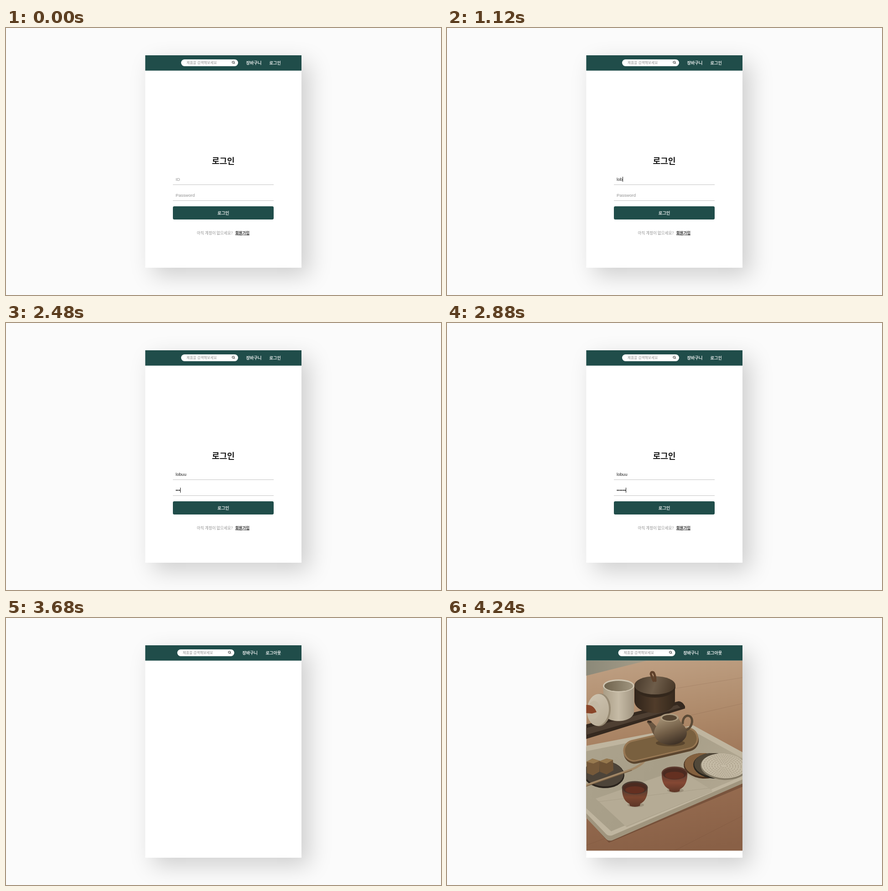
Recreate the animation shown at these times as an HTML page with a canvas. Size 954 by 587 pixels, loop 5.04 s.

```html
<!DOCTYPE html>
<html lang="ko">
<head>
<meta charset="utf-8">
<title>로그인</title>
<style>
html, body { margin: 0; width: 100%; height: 100%; overflow: hidden; background: #fbfbfb; }
canvas { display: block; }
</style>
</head>
<body>
<canvas id="stage" width="954" height="587"></canvas>
<script>
const ctx = document.getElementById('stage').getContext('2d');
const LOOP = 5040;
const KO = '"Noto Sans CJK KR", "Noto Sans CJK", sans-serif';
const ARIAL = '"Liberation Sans", sans-serif';
const GREEN = '#204d4a', INK = '#1b1b1b', GRAY = '#929292';
const CARD = { x: 305.4, y: 60, w: 342.6, h: 467 };

const USER = 'lobuu';
const ID_KEYS = [960, 1040, 1120, 1280, 1360];
const PW_KEYS = [2240, 2320, 2480, 2640, 2720, 2880];
const CARET_ON = [[240, 720], [960, 2000], [2240, 3280]];
const FOCUS_PW = 1600, LOGGED_IN = 3520, FORM_GONE = 3680, PHOTO_TOP = 4080, PHOTO_FULL = 4240;

function rect(x, y, w, h, color) {
  ctx.fillStyle = color;
  ctx.fillRect(x, y, w, h);
}

function round(x, y, w, h, r, color) {
  ctx.fillStyle = color;
  ctx.beginPath();
  ctx.roundRect(x, y, w, h, r);
  ctx.fill();
}

function oval(x, y, rx, ry, color, tilt = 0) {
  ctx.fillStyle = color;
  ctx.beginPath();
  ctx.ellipse(x, y, rx, ry, tilt, 0, Math.PI * 2);
  ctx.fill();
}

function shape(path, color) {
  ctx.fillStyle = color;
  ctx.fill(new Path2D(path));
}

function line(path, color, width) {
  ctx.strokeStyle = color;
  ctx.lineWidth = width;
  ctx.lineCap = ctx.lineJoin = 'round';
  ctx.stroke(new Path2D(path));
}

// A thin outline stands in for the medium weight.
function text(str, x, y, size, color, { font = KO, weight = 400, align = 'left', medium = false } = {}) {
  ctx.font = `${weight} ${size}px ${font}`;
  ctx.textAlign = align;
  ctx.fillStyle = ctx.strokeStyle = color;
  ctx.fillText(str, x, y);
  if (medium) {
    ctx.lineWidth = 0.25;
    ctx.strokeText(str, x, y);
  }
}

// Linear gradient between two points with evenly spaced colours.
function fade(x0, y0, x1, y1, ...colors) {
  const g = ctx.createLinearGradient(x0, y0, x1, y1);
  colors.forEach((c, i) => g.addColorStop(i / (colors.length - 1), c));
  return g;
}

function drawCard() {
  rect(0, 0, 954, 587, '#fbfbfb');
  ctx.save();
  ctx.shadowColor = 'rgba(0,0,0,.18)';
  ctx.shadowBlur = 47;
  ctx.shadowOffsetX = ctx.shadowOffsetY = 17;
  rect(CARD.x, CARD.y, CARD.w, CARD.h, '#fff');
  ctx.restore();
}

function drawHeader(loggedIn) {
  rect(CARD.x, CARD.y, CARD.w, 33.7, GREEN);
  const dx = loggedIn ? -8.4 : 0;
  round(384 + dx, 69, 125, 15, 7.5, '#fff');
  text('제품을 검색해보세요', 396 + dx, 79.2, 7.8, GRAY);
  ctx.save();
  ctx.translate(498.3 + dx, 75.2);
  line('M2.4 0A2.4 2.4 0 1 1-2.4 0A2.4 2.4 0 1 1 2.4 0M1.8 1.8L3.4 3.4', INK, 1);
  ctx.restore();
  text('장바구니', 526.6 + dx, 80, 9.2, '#fff', { medium: true });
  text(loggedIn ? '로그아웃' : '로그인', loggedIn ? 569.4 : 577.6, 80, 9.2, '#fff', { medium: true });
}

function drawField(value, hint, base, caret) {
  text(value || hint, 372, base, 9.6, value ? INK : GRAY, { font: ARIAL });
  rect(366, base + 8, 221, 1, '#c4c4c4');
  if (caret) rect(Math.round(372 + ctx.measureText(value).width), base - 9, 1, 11, '#111');
}

function drawForm(t) {
  const typed = keys => keys.filter(k => t >= k).length;
  const caret = CARET_ON.some(([a, b]) => t >= a && t < b);
  text('로그인', 476.5, 299.3, 18.2, INK, { weight: 700, align: 'center' });
  drawField(USER.slice(0, typed(ID_KEYS)), 'ID', 336, caret && t < FOCUS_PW);
  drawField('•'.repeat(typed(PW_KEYS)), 'Password', 371, caret && t >= FOCUS_PW);
  round(366, 392, 221, 29, 3, GREEN);
  text('로그인', 476.5, 410.1, 9.3, '#fff', { align: 'center', medium: true });
  text('아직 계정이 없으세요?', 418.7, 453.7, 8.55, GRAY);
  text('회원가입', 502.7, 453.7, 8.55, INK, { medium: true });
  rect(503, 454.6, 31, 0.8, INK);
}

function drawTeaCup(x, y, glaze, clay) {
  oval(x + 2, y + 38, 18, 5, 'rgba(60,45,30,.2)');
  shape(`M${x - 28} ${y}C${x - 29} ${y + 24} ${x - 18} ${y + 33} ${x - 12} ${y + 35}
    L${x - 11} ${y + 40}Q${x} ${y + 44} ${x + 11} ${y + 40}L${x + 12} ${y + 35}
    C${x + 18} ${y + 33} ${x + 29} ${y + 24} ${x + 28} ${y}Z`,
    fade(0, y, 0, y + 42, glaze, clay, '#5c3526'));
  oval(x, y, 28.5, 14.5, glaze);
  oval(x, y + 1, 26, 12.5, '#4b2a20');
  oval(x, y + 5, 21, 8, '#643021');
}

function drawBackRow() {
  shape('M305 94H437L305 127Z', fade(305, 94, 420, 94, '#8b8979', '#a39a86'));
  shape('M305 234L508 183Q516 183 522 194V199L305 266Z', '#35291f');
  shape('M305 242L505 191L512 197L305 257Z', '#4e3f32');

  // covered pot
  shape('M411 150V182C411 200 436 209 457 209C481 209 500 199 500 181V150Z',
    fade(411, 0, 501, 0, '#30241a', '#503c2a', '#35281c'));
  oval(456, 152, 45, 23, '#33271c');
  oval(456, 148, 45, 20, fade(411, 130, 501, 160, '#46382a', '#6e5d4a', '#463626'));
  line('M453 138L447 123Q448 117 453 120Q457 126 457 138', '#5f412b', 5);

  // tall cup
  shape('M342 149L346 212C350 232 405 232 410 208V149Z',
    fade(342, 0, 411, 0, '#a99d86', '#c6bba6', '#a09480'));
  oval(376.5, 149, 34.5, 14, '#cfc5b1');
  oval(376.5, 149.5, 31.5, 11.5, fade(345, 0, 408, 0, '#6f634d', '#a0957f'));

  // leaning lid
  oval(335, 202, 24, 36, '#988b74', 0.08);
  oval(331, 202, 24, 35, fade(305, 170, 355, 235, '#cfc5b2', '#b7ab95'), 0.08);
  oval(322, 202, 13, 20, '#c3b8a3', 0.08);
  shape('M305 191Q322 190 328 207L318 210L305 209Z', '#8a4529');
}

function drawTeapot() {
  ctx.save();
  ctx.translate(469, 279);
  ctx.rotate(-0.23);
  round(-84, -21, 168, 49, 25, '#5b452e');
  round(-84, -25, 168, 48, 24, '#977753');
  round(-80, -21, 160, 41, 20, '#79603f');
  ctx.restore();

  oval(490, 275, 32, 7, 'rgba(40,28,18,.4)');
  line('M517 231C517 209 541 210 537 231C534 243 527 246 520 248', '#5b4a36', 5);
  shape('M438 229Q444 224 450 229L463 242L468 265Q455 264 449 248Q446 237 438 229Z', '#695540');
  shape('M468 219C466 232 453 240 454 255C456 270 474 279 490 279C509 279 526 268 526 252C525 236 511 232 508 219Z',
    fade(475, 220, 498, 280, '#a08d71', '#715d46', '#3c2f24'));
  oval(488, 219, 20, 9, '#ac9b7f');
  oval(488, 219.5, 16, 6.5, '#574633');
  oval(444, 228, 5, 2.5, '#3f3024', 0.2);
}

function drawCoaster(x, y, rx, ry, edge, face) {
  oval(x, y + 2, rx, ry, edge, 0.07);
  oval(x, y, rx - 2, ry - 2, face, 0.07);
}

function drawFrontTray() {
  shape('M305 438L355 494L648 371V362L356 484Z', 'rgba(60,36,22,.3)');
  shape('M305 284L541 237L648 298V364L362 489Q354 491 349 486L305 439Z', '#a0957e');
  shape('M305 281L540 236L648 295V355L362 478Q354 480 349 475L305 429Z', '#bfb59f');
  shape('M305 293L535 246L648 308V348L360 469L305 418Z',
    fade(340, 270, 560, 430, '#aba28c', '#a79e88', '#b0a690'));
  shape('M326 397L509 333L582 379L394 460Z', '#b5ab95');
  line('M331 404L575 374M394 458L581 381', '#a99f89', 1);

  drawCoaster(563, 323, 44, 28, '#4a3320', '#83603e');
  drawCoaster(586, 323, 46, 28, '#29261f', '#514839');
  drawCoaster(607, 325, 51, 29, '#857b67', '#c4baa5');
  ctx.setLineDash([2, 3]);
  for (let r = 8; r < 46; r += 6) {
    ctx.strokeStyle = '#a99e88';
    ctx.lineWidth = 1.5;
    ctx.beginPath();
    ctx.ellipse(607, 325, r, r * 0.55, 0.07, 0, Math.PI * 2);
    ctx.stroke();
  }
  ctx.setLineDash([]);

  drawCoaster(344, 342, 45, 30, '#2b241d', '#4d4439');
  shape('M306 316L319 309L335 314L334 338L320 346L307 341Z', '#75593a');
  shape('M306 316L319 309L335 314L321 320Z', '#987a50');
  shape('M334 315L350 309L364 312L365 335L350 344L335 338Z', '#6d5235');
  shape('M334 315L350 309L364 312L350 320Z', '#95774d');
  line('M305 368L405 333Q426 324 434 313', '#a28867', 5);
  line('M305 370L405 335', '#765c40', 1.5);

  drawTeapot();
  drawTeaCup(412, 373, '#493a31', '#7b452f');
  drawTeaCup(499, 341, '#5c3a2e', '#854834');
}

function drawPhoto(bottom) {
  ctx.save();
  ctx.beginPath();
  ctx.rect(CARD.x, 93.7, CARD.w, bottom - 93.7);
  ctx.clip();
  rect(CARD.x, 93, CARD.w, 420, fade(470, 94, 510, 511, '#bd9e81', '#ac8767', '#966c50', '#896046'));
  line('M500 155L648 131M530 215L648 188M305 500L390 468M500 511L648 435', 'rgba(85,55,36,.14)', 1);
  drawBackRow();
  drawFrontTray();
  ctx.restore();
}

function draw(t) {
  drawCard();
  drawHeader(t >= LOGGED_IN);
  if (t < FORM_GONE) drawForm(t);
  if (t >= PHOTO_TOP) drawPhoto(t < PHOTO_FULL ? 242.3 : 511.5);
}

const start = performance.now();
function tick() {
  draw((performance.now() - start) % LOOP);
  requestAnimationFrame(tick);
}
tick();
</script>
</body>
</html>
```
